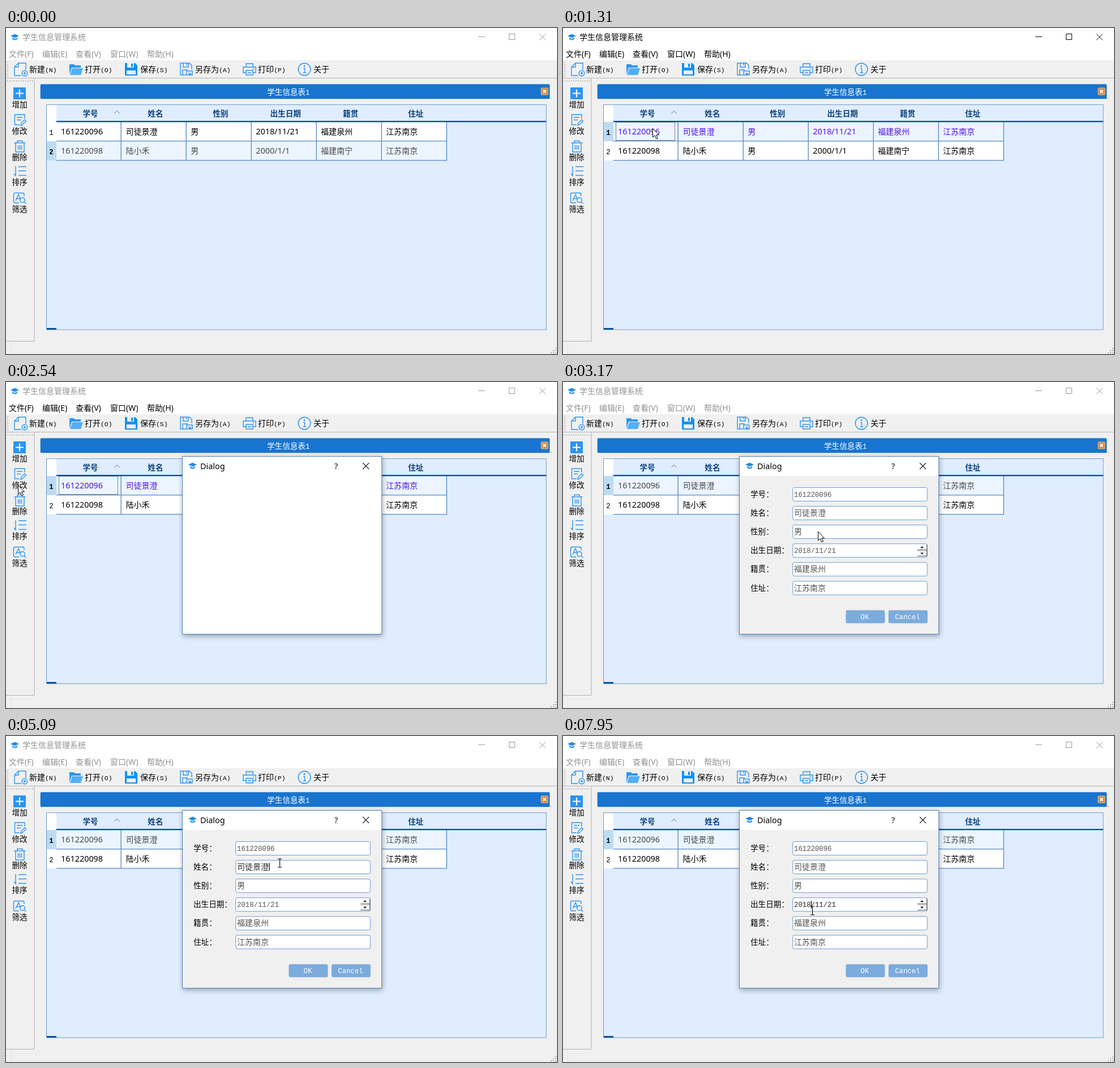
Animation, 973 px wide and 576 px high, one loop 8 s. Source, as an HTML page:

```html
<!DOCTYPE html>
<html lang="zh-CN">
<head>
<meta charset="utf-8">
<title>学生信息管理系统</title>
<style>
html, body { margin: 0; width: 100%; height: 100%; overflow: hidden; background: #f0f0f0; }
svg { display: block; width: 973px; height: 576px; }
text { white-space: pre; }
.ui { font: 14px "Noto Sans", "Noto Sans CJK SC", sans-serif; }
.sim { font: 14px "Noto Sans CJK SC", sans-serif; }
.sim .latin { font: 12.3px "Liberation Mono", monospace; }
.tool .latin { font-size: 11.4px; }
.label { font-size: 13.6px; }
.digits { font-size: 14.4px; }
.head { font-weight: bold; font-size: 13.6px; fill: #0b427f; }
.mid { text-anchor: middle; }
.line { fill: none; stroke: #2b93f3; stroke-width: 1.4; }
.solid { fill: #2b93f3; }
.grid { fill: none; stroke: #6c9bd0; stroke-width: 1.6; }
.chrome { fill: none; stroke: #999; }
.title, .menu { fill: #929292; }
.on.title, .on.menu { fill: #000; }
.on .chrome { stroke: #000; }
.row .cells, .row .index { fill: #fff; }
.row.sel .cells { fill: #ecf5ff; }
.row.sel .index { fill: #bcdcf4; }
.row.sel .latin { font-weight: bold; }
.row.sel .value { fill: #484848; }
.row.sel.active .value { fill: #5010f0; }
.field { fill: #fff; stroke: #6c9bd0; }
.entry { fill: #555; }
.entry.focus { fill: #2c2c2c; }
</style>
</head>
<body>
<svg id="stage" viewBox="0 0 973 576"></svg>
<script>
const LOOP = 8000, FIRST = 215, TICK = 77.3;
const people = ['司徒景澄', '陆小禾'];
const records = [
  ['161220096', people[0], '男', '2018/11/21', '福建泉州', '江苏南京'],
  ['161220098', people[1], '男', '2000/1/1', '福建南宁', '江苏南京']
];
const headings = ['学号', '姓名', '性别', '出生日期', '籍贯', '住址'];

const rect = (x, y, w, h, attrs) => `<rect x="${x}" y="${y}" width="${w}" height="${h}" ${attrs}/>`;
const path = (d, attrs = 'class="line"') => `<path d="${d}" ${attrs}/>`;
const ui = (x, y, s, cls = '') => `<text x="${x}" y="${y}" class="ui ${cls}">${s}</text>`;
const sim = (x, y, s, cls = '', attrs = '') =>
  `<text x="${x}" y="${y}" class="sim ${cls}" ${attrs}>` +
  s.replace(/[\x21-\x7e]+/g, '<tspan class="latin">$&</tspan>') + '</text>';
const group = (id, body, attrs = '') => `<g id="${id}" ${attrs}>${body}</g>`;

const capIcon = (dx, dy) => `<g transform="translate(${dx} ${dy})">` +
  path('M8 14L15.500 10.500L23 14L15.500 17.500Z', 'fill="#2389e8"') +
  path('M11 16.500V20Q15.500 23 20 20V16.500L15.500 19Z', 'fill="#45a2f3"') + '</g>';

function toolbar() {
  const labels = [[41, '新建(N)'], [139, '打开(O)'], [237, '保存(S)'], [334, '另存为(A)'], [445, '打印(P)'], [543, '关于']];
  return rect(0, 57, 973, 519, 'fill="#f0f0f0"') +
    path('M0 88.500H973', 'stroke="#b4b4b4"') +
    path('M3 60V87', 'stroke="#999" stroke-width="1.5" stroke-dasharray="1.5 2.5"') +
    path('M27 84H15V69L22 62H35V74M22 62V69H15') +
    '<circle cx="33" cy="80" r="4.800" fill="#f0f0f0" class="line"/>' + path('M30.500 80H35.500M33 77.500V82.500') +
    path('M112 82V64H120L122 66H132V70H116Z', 'fill="#2b97f5"') + path('M113 83L117 71H136L132 83Z', 'fill="#53aefa"') +
    path('M210 62H228L232 66V84H210Z', 'fill="#0c92f5"') +
    rect(214, 62, 12, 8, 'fill="#f0f0f0"') + rect(221, 63, 3, 6, 'fill="#0c92f5"') + rect(213, 75, 16, 7, 'fill="#f0f0f0"') +
    path('M318 83H308V62H324L328 66V73M313 62V69H322V62M312 83V74H321M319 62V66') +
    path('M319 76H329V83H319ZM322 79L326 82M323 82H326V79') +
    path('M424 69V63H436V69M424 79H419V69H441V79H436M424 75H436V83H424ZM427 79H433M436 72H438') +
    '<circle cx="527" cy="73" r="10.800" class="line"/><circle cx="527" cy="67.500" r="1.400" class="solid"/>' +
    path('M525 71.500H527.500V79M524.500 79H530') +
    labels.map(([x, s]) => sim(x, 78, s, 'tool')).join('');
}

function sidebar() {
  const labels = [[140, '增加'], [187, '修改'], [233, '删除'], [277, '排序'], [325, '筛选']];
  return path('M2 93.500H48', 'stroke="#999" stroke-width="1.5" stroke-dasharray="1.5 2.5"') +
    path('M50 89V553.500H0', 'fill="none" stroke="#b0b0b0"') +
    path('M8.500 556V576', 'stroke="#d0e8e4"') +
    rect(0, 146, 49, 46, 'id="hover" fill="#bfdcf4" stroke="#91c4ec"') +
    rect(13, 105, 22, 21, 'class="solid"') + path('M17 115.500H31M24 108.500V122.500', 'stroke="#fff" stroke-width="2.2"') +
    path('M24 171H15.500V153H33V160M19 158H29M19 162.500H26M26 172L27 168L33 162L35.500 164.500L29 171Z') +
    path('M14.500 203H34.500M20 203V199.500H29V203M17 203V219H32V203M21.500 207V215M24.500 207V215M27.500 207V215') +
    path('M17 244V261L14 257.500M22 245H36M22 252.500H36M22 260.500H36') +
    path('M23 309H16Q13.500 309 13.500 306.500V294Q13.500 291.500 16 291.500H29Q32 291.500 32 294V297M17 305L22 294.500L26 303M19 301.500H24') +
    '<circle cx="29" cy="304" r="4.300" class="line"/>' + path('M32 307L35.500 310.500') +
    labels.map(([y, s]) => sim(24, y, s, 'label mid')).join('');
}

function tableRow(values, i) {
  const y = 166 + 34 * i;
  return group('row' + i,
    rect(72, y, 17, 34, 'class="index"') + rect(89, y, 689, 34, 'class="cells"') +
    sim(80, y + 23, String(i + 1), 'mid') +
    values.map((s, c) => ui(c ? 96.5 + 114.9 * c : 97, y + 22, s, /\d/.test(s) ? 'value digits' : 'value')).join(''),
    'class="row"');
}

function table() {
  const columns = headings.map((_, c) => `M${203.2 + 115 * c} 166V234`).join('');
  return rect(60.7, 99.2, 899.5, 26, 'rx="2" fill="#1874cf"') + path('M960.500 124.500H964', 'stroke="#aaa"') +
    sim(461, 117.5, '学生信息表1', 'label', 'fill="#fff"') +
    rect(945, 106, 12, 12, 'rx="1" fill="#d6883e" stroke="#f3c28f"') +
    path('M948.500 109.500L953.500 114.500M953.500 109.500L948.500 114.500', 'stroke="#fff" stroke-width="2"') +
    rect(71.5, 135.5, 882.5, 397.5, 'fill="#e0edff" stroke="#6c9bd0"') +
    rect(72, 136, 17, 30, 'fill="#fff"') +
    headings.map((s, c) => ui(149 + 114.9 * c, 155.5, s, 'head mid')).join('') +
    path('M191.500 151L196 146.500L200.500 151', 'fill="none" stroke="#667"') +
    records.map(tableRow).join('') +
    path(columns + 'M89 199.700H778M89 233.700H779', 'class="grid"') +
    rect(89, 164, 865, 2.4, 'fill="#0a52a0"') + rect(72, 530, 17, 3, 'fill="#0a52a0"') +
    rect(93.5, 166.5, 104, 32, 'id="focus" fill="none" stroke="#111" stroke-dasharray="1 1"');
}

function dialog() {
  const fields = headings.map((name, i) => {
    const y = 186.5 + 33.1 * i;
    return sim(331, y + 16.5, name + '：', 'label') + rect(405.7, y, 237.5, 24, 'rx="3" class="field"') +
      sim(408, y + 16.5, records[0][i], 'entry', `id="entry${i}"`);
  }).join('');
  const button = (x, s) => rect(x, 403.2, 69, 23, 'rx="3" fill="#7cabdd"') + sim(x + 33.5, 419, s, 'mid', 'fill="#fff"');
  return rect(311.5, 131.5, 352, 314, 'fill="#fff" stroke="#4e86bd" style="filter:drop-shadow(1px 3px 5px #0005)"') +
    capIcon(314, 132) + ui(343, 154, 'Dialog', 'digits') + ui(583, 154, '?', 'mid') +
    path('M630 143L641 154M641 143L630 154', 'stroke="#222" stroke-width="1.2"') +
    group('form', rect(312, 166, 351, 279, 'fill="#f0f0f0"') + fields +
      path('M631 293.500L634 290L637 293.500ZM631 301.500L634 305L637 301.500Z', 'fill="#222"') +
      path('M626 296.500H642.500M626 307.500H642.500V287', 'fill="none" stroke="#555"') +
      path('M626 298.500H642', 'stroke="#aaa"') +
      button(499.4, 'OK') + button(574.8, 'Cancel') +
      path('M0 0V14', 'id="caret" stroke="#000" stroke-width="1.2"'));
}

const menus = [[5, '文件(F)'], [64, '编辑(E)'], [123, '查看(V)'], [184, '窗口(W)'], [249, '帮助(H)']];
const grip = [[970, 566], [966, 570], [970, 570], [962, 574], [966, 574], [970, 574]];

document.getElementById('stage').innerHTML =
  rect(0, 0, 973, 576, 'fill="#fff"') + capIcon(0, 0) +
  group('title', ui(29, 21, '学生信息管理系统') +
    path('M834 15.500H846M888.500 10.500H898.500V20.500H888.500ZM942 10.500L953 21.500M953 10.500L942 21.500', 'class="chrome"'), 'class="title"') +
  toolbar() +
  group('menu', menus.map(([x, s]) => ui(x, 51, s)).join(''), 'class="menu"') +
  sidebar() + table() +
  grip.map(([x, y]) => rect(x, y - 1, 2, 2, 'fill="#aaa"')).join('') +
  group('dialog', dialog()) +
  group('arrow', path('M0 0V15.500L3.600 12.300L6.300 18.300L8.800 17.200L6.200 11.400H11Z', 'fill="#fff" stroke="#000"')) +
  group('beam', path('M-3.500 -7.500H-1L0 -6.500L1 -7.500H3.500M-3.500 7.500H-1L0 6.500L1 7.500H3.500M0 -6.500V6.500', 'fill="none" stroke="#111" stroke-width="1.2"'));

// Pointer waypoints: tick, x, y
const pointer = [
  [0, 858, 562], [3, 600, 450], [6, 180, 270], [8, 82, 224], [10, 152, 182], [11, 158, 177],
  [17, 158, 177], [18, 150, 179], [24, 32, 184], [27, 21, 182], [31, 21, 182], [34, 260, 234],
  [38, 450, 264], [39, 462, 247], [41, 462, 247], [42, 478, 236], [51, 476, 235], [58, 481, 228],
  [60, 483, 224], [63, 483, 224], [65, 468, 238], [67, 453, 245], [86, 453, 245], [92, 442, 305],
  [99, 442, 305], [100, 440, 308]
];
// Ticks at which the blinking caret turns on or off
const blinks = [44, 51, 57, 64, 71, 78, 85, 94];

function pointerAt(k) {
  const i = pointer.findIndex(p => p[0] > k);
  if (i < 0) return pointer[pointer.length - 1].slice(1);
  if (i === 0) return pointer[0].slice(1);
  const [a, b] = [pointer[i - 1], pointer[i]], u = (k - a[0]) / (b[0] - a[0]);
  return [1, 2].map(n => Math.round(a[n] + (b[n] - a[n]) * u));
}

const el = id => document.getElementById(id);
const show = (id, on) => { el(id).style.display = on ? '' : 'none'; };
const mark = (id, cls, on) => el(id).classList.toggle(cls, on);
const place = (id, x, y) => el(id).setAttribute('transform', `translate(${x} ${y})`);

function draw(time) {
  const k = Math.floor((time - FIRST) / TICK);
  const within = (from, to) => k >= from && k < to;
  const picked = k >= 14, open = k >= 30, dated = k >= 94;
  mark('title', 'on', within(13, 30));
  mark('menu', 'on', within(13, 31));
  mark('row0', 'sel', picked);
  mark('row0', 'active', within(14, 31));
  mark('row1', 'sel', !picked);
  show('focus', within(14, 31));
  show('hover', within(24, 30));
  show('dialog', open);
  show('form', k >= 31);
  mark('entry1', 'focus', within(42, 94));
  mark('entry3', 'focus', dated);
  show('caret', dated || blinks.filter(b => b <= k).length % 2 === 1);
  place('caret', dated ? 438.5 : 465, dated ? 291 : 224);

  const [x, y] = pointerAt(k);
  const inField = open && x > 405 && x < 626 && (y > 218 && y < 244 || y > 285 && y < 310);
  show('arrow', k >= 0 && !inField);
  show('beam', k >= 0 && inField);
  place('arrow', x + 0.5, y + 0.5);
  place('beam', x + 0.5, y + 0.5);
}

function frame() {
  draw(performance.now() % LOOP);
  requestAnimationFrame(frame);
}
frame();
</script>
</body>
</html>
```
